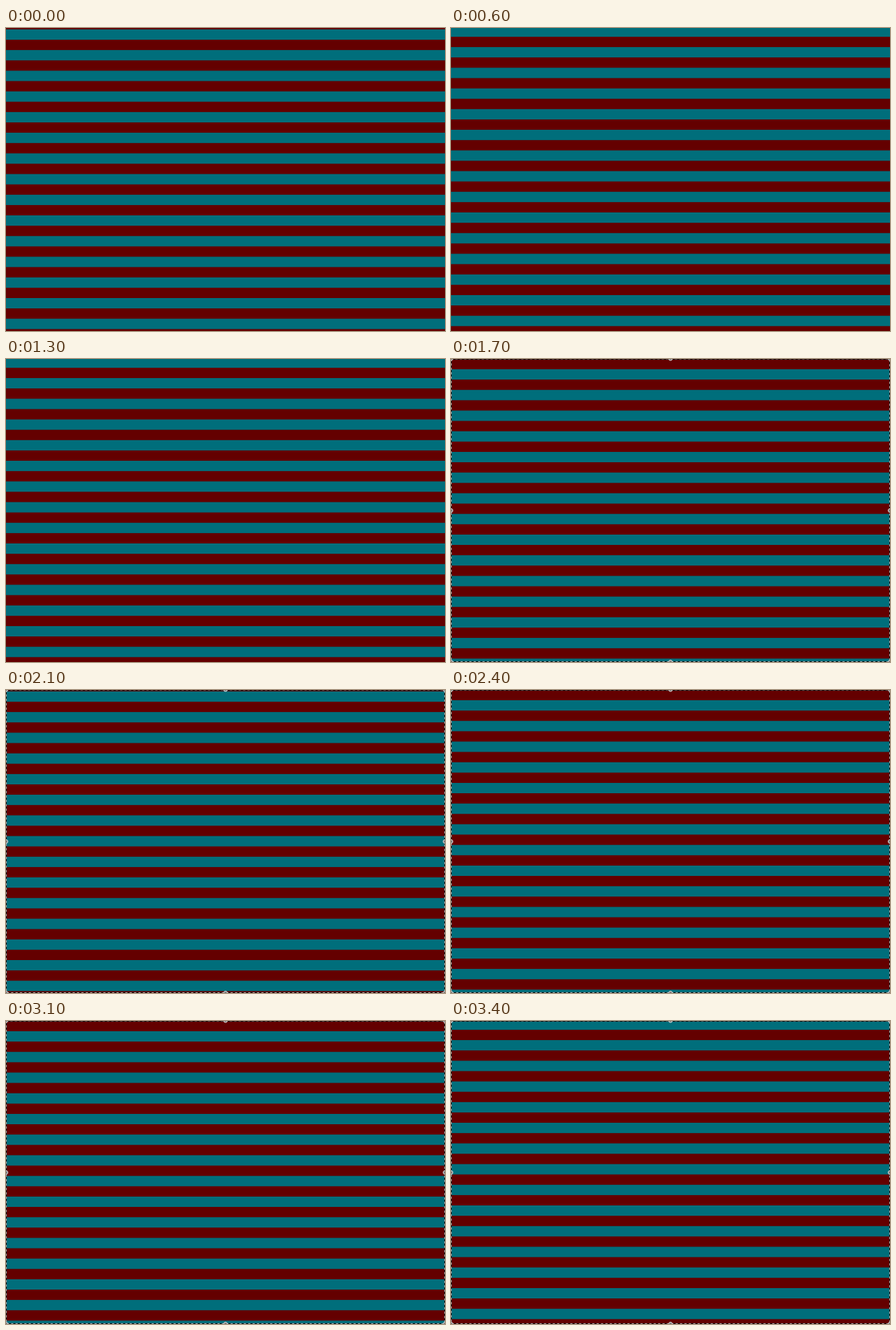
Recreate the animation shown at these times as an HTML page with a canvas. Size 600 px wide and 414 px high, loop 3.5 s.

```html
<!DOCTYPE html>
<html>
<head>
<meta charset="utf-8">
<style>
html, body { margin: 0; width: 100%; height: 100%; overflow: hidden; background: #006e7b; }
canvas { display: block; }
</style>
</head>
<body>
<canvas id="stage" width="600" height="414"></canvas>
<script>
const W = 600, H = 414, LOOP = 3500, STEP = 100;
const PITCH = 28.24, CYCLE = 7, FRAME_FROM = 14;
const ctx = document.getElementById('stage').getContext('2d');

function stripes(step) {
  ctx.fillStyle = '#006e7b';
  ctx.fillRect(0, 0, W, H);
  ctx.fillStyle = '#640000';
  const start = 16 + (step % CYCLE) * PITCH / CYCLE;
  for (let y = start - 2 * PITCH; y < H; y += PITCH) ctx.fillRect(0, y, W, PITCH / 2);
}

function handle(x, y) {
  ctx.beginPath();
  ctx.arc(x, y, 2.5, 0, 2 * Math.PI);
  ctx.fillStyle = '#777';
  ctx.fill();
  ctx.strokeStyle = '#ddd';
  ctx.stroke();
}

// Dashed selection outline with round handles, cut off by the stage edge
function selection() {
  ctx.lineWidth = 1;
  ctx.strokeStyle = '#111';
  ctx.strokeRect(0.5, 0.5, W - 1, H - 1);
  ctx.setLineDash([3, 3]);
  ctx.strokeStyle = '#999';
  ctx.beginPath();
  ctx.moveTo(0.5, 0);
  ctx.lineTo(0.5, H - 0.5);
  ctx.lineTo(W - 0.5, H - 0.5);
  ctx.lineTo(W - 0.5, 0);
  ctx.stroke();
  ctx.strokeStyle = '#444';
  ctx.beginPath();
  ctx.moveTo(0, 0.5);
  ctx.lineTo(W, 0.5);
  ctx.stroke();
  ctx.setLineDash([]);
  for (const x of [0, W / 2, W])
    for (const y of [-0.5, H / 2, H])
      if (x !== W / 2 || y !== H / 2) handle(x, y);
}

function draw() {
  const step = Math.floor(performance.now() % LOOP / STEP);
  stripes(step);
  if (step >= FRAME_FROM) selection();
  requestAnimationFrame(draw);
}
draw();
</script>
</body>
</html>
```
